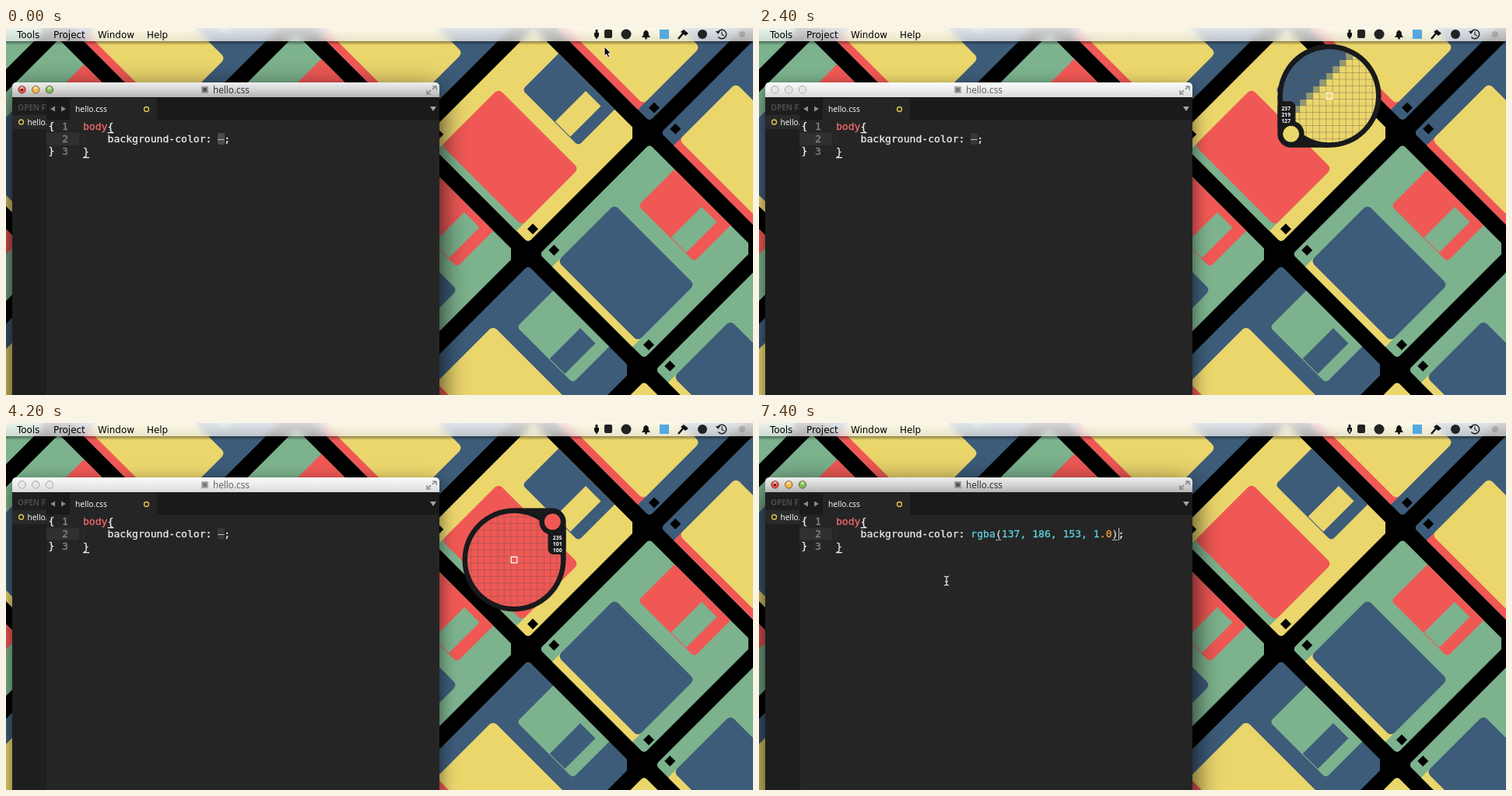
An HTML page with a canvas that plays this animation: 960 px wide and 472 px high, repeating every 7.6 s.

```html
<!DOCTYPE html>
<html lang="en">
<head>
<meta charset="utf-8">
<title>Color picker demo</title>
<style>
html, body { margin: 0; width: 100%; height: 100%; overflow: hidden; background: #000; }
canvas { display: block; }
</style>
</head>
<body>
<canvas id="stage" width="960" height="472"></canvas>
<script>
const W = 960, H = 472, LOOP = 7600, STEP = 200;
const stage = document.getElementById('stage').getContext('2d');
const UI = '"DejaVu Sans", sans-serif';
const LABEL = '"Noto Sans", sans-serif';
const CODE = '13.09px "DejaVu Sans Mono", monospace';
const YELLOW = '#ebd66c', RED = '#f05855', GREEN = '#7cb28d', BLUE = '#3d5c79';
let c = stage;

function text(str, x, y, color = '#000', font = '11.9px ' + UI, align = 'left') {
  c.fillStyle = color;
  c.font = font;
  c.textAlign = align;
  c.fillText(str, x, y);
}
function box(x, y, w, h, color, radius = 0) {
  c.fillStyle = color;
  c.beginPath();
  c.roundRect(x, y, w, h, radius);
  c.fill();
}
function dot(x, y, r, fill, stroke, width = 1) {
  c.beginPath();
  c.arc(x, y, r, 0, 7);
  if (fill) { c.fillStyle = fill; c.fill(); }
  if (stroke) { c.strokeStyle = stroke; c.lineWidth = width; c.stroke(); }
}
function shape(points, fill, stroke, width = 1) {
  c.beginPath();
  points.forEach(([x, y]) => c.lineTo(x, y));
  if (fill) { c.closePath(); c.fillStyle = fill; c.fill(); }
  if (stroke) { c.strokeStyle = stroke; c.lineWidth = width; c.stroke(); }
}
function fade(y0, y1, ...colors) {
  const g = c.createLinearGradient(0, y0, 0, y1);
  colors.forEach((color, i) => g.addColorStop(i / (colors.length - 1), color));
  return g;
}
function shadow(color, blur, dy) {
  c.shadowColor = color;
  c.shadowBlur = blur;
  c.shadowOffsetY = dy;
}

// Wallpaper: floppy disks on a diagonal lattice, in axes s = x + y and d = x - y.
const SCHEMES = {
  y: [YELLOW, RED, GREEN, BLUE],
  g: [GREEN, BLUE, YELLOW, RED],
  b: [BLUE, YELLOW, RED, GREEN]
};
const DISKS = [
  ['y', 0, 0], ['g', 1, 0], ['g', 2, 0], ['g', 0, 1], ['b', 1, 1], ['y', 2, 1],
  ['b', 0, -1], ['b', 1, -1], ['b', -1, 0], ['g', -1, 1], ['b', -2, 1],
  ['g', -2, 2], ['g', -3, 2], ['g', -2, 3], ['b', -1, 3]
];
function disk([scheme, i, j]) {
  const [body, label, stripe, shutter] = SCHEMES[scheme];
  c.save();
  c.transform(.5, .5, .5, -.5, 0, 0);
  c.translate(298 * i, -312 * j);
  box(678.5, 395, 268.5, 282.5, body, [7, 7, 0, 7]);
  shape([[948, 662], [948, 678.5], [931.5, 678.5]], '#000');
  box(711, 395, 206, 22, stripe);
  box(711, 409, 206, 146, label, 9);
  box(743, 584, 144, 93.5, shutter, [7, 7, 0, 0]);
  box(826, 585.5, 39, 78.5, body);
  box(928.5, 411.5, 14, 14, '#000');
  box(685, 411.5, 14, 14, '#000');
  c.restore();
}
const wallCanvas = document.createElement('canvas');
wallCanvas.width = W;
wallCanvas.height = H;
const wall = wallCanvas.getContext('2d', { willReadFrequently: true });
c = wall;
box(0, 0, W, H, '#000');
DISKS.forEach(disk);
c = stage;

function menuBar(open, picked) {
  c.save();
  c.beginPath();
  c.rect(0, 0, W, 17);
  c.clip();
  c.filter = 'blur(5px)';
  c.drawImage(wallCanvas, 0, 0);
  c.restore();
  box(0, 0, W, 17, fade(0, 17, 'rgba(255,255,255,.84)', 'rgba(235,235,235,.74)'));
  box(0, 17, W, 5, fade(17, 22, 'rgba(0,0,0,.4)', 'rgba(0,0,0,0)'));
  [['Tools', 14], ['Project', 61], ['Window', 118], ['Help', 181]]
    .forEach(([name, x]) => text(name, x, 12.5));

  if (open) box(754, 0, 10.5, 17, '#2450dc');
  box(757.5, 2, 3, 4, '#111', 1);
  shape([[756, 6], [762, 6], [762, 10], [759, 14.5], [756, 10]], '#111');
  if (picked) box(758, 8, 2, 4, GREEN);
  box(769, 2, 10, 11, '#222', 2);
  dot(797, 8, 6.5, '#222');
  shape([[817, 12], [819, 9], [819.5, 5], [822.5, 2.5], [825.5, 5], [826, 9], [828, 12]], '#111');
  dot(822.5, 13, 1.5, '#111');
  box(840, 2, 12, 12, '#55a9df');
  shape([[864, 14], [870, 7]], null, '#111', 2.5);
  shape([[867, 5], [871, 2], [877, 7], [873, 10]], '#111');
  dot(895, 8, 6, '#222');
  c.beginPath();
  c.arc(920, 8, 5.7, -2.6, 2.5);
  c.strokeStyle = '#222';
  c.lineWidth = 1.5;
  c.stroke();
  shape([[912, 4], [918, 4], [915, 8]], '#222');
  shape([[920, 4.5], [920, 8.5], [923, 10]], null, '#222', 1.2);
  dot(946, 8, 4, 'rgba(120,120,120,.4)');
}

function editorWindow(active, pasted, bright) {
  c.save();
  shadow(active ? 'rgba(0,0,0,.85)' : 'rgba(0,0,0,.6)', active ? 36 : 22, active ? 12 : 7);
  box(8, 70, 549, 440, '#252525', [5, 5, 0, 0]);
  c.restore();
  box(8, 70, 549, 19, active
    ? fade(70, 89, '#eeeeee', '#d5d5d5', '#b4b4b4')
    : fade(70, 89, '#fafafa', '#ececec', '#dadada'), [5, 5, 0, 0]);
  ['#e5504a', '#efb446', '#7fba54'].forEach((color, i) => {
    dot(20.5 + 17.7 * i, 79.3, 4.8, active ? color : '#e6e6e6', active ? 'rgba(70,40,20,.6)' : '#aaa');
    if (active) dot(20.5 + 17.7 * i, 77.3, 2.2, 'rgba(255,255,255,.5)');
  });
  if (active) dot(20.5, 79.5, 1.5, '#5d1111');
  box(251, 75, 9, 9, active ? '#999' : '#aaa', 1);
  box(253, 77, 5, 5, active ? '#555' : '#777');
  text('hello.css', 266, 83.7, active ? '#333' : '#666', '500 11.7px ' + LABEL);
  shape([[548, 75], [553, 75], [553, 80]], null, '#6b7480', 1.2);
  shape([[541, 80], [541, 85], [546, 85]], null, '#6b7480', 1.2);
  shape([[548, 79], [552, 75]], null, '#6b7480', 1.2);
  shape([[546, 80], [542, 84]], null, '#6b7480', 1.2);

  box(8, 89, 44, 383, '#1e1e1e');
  box(52, 89, 505, 29, '#1a1a1a');
  box(82, 90, 112, 28, '#252525', [3, 3, 0, 0]);
  box(8, 112, 44, 18, '#292929');
  c.save();
  c.beginPath();
  c.rect(8, 89, 44, 383);
  c.clip();
  text('OPEN FILES', 15, 106, '#4b4b4b', '600 10px ' + LABEL);
  text('hello.css', 27.5, 124.5, '#f0f0f0', '10px ' + LABEL);
  c.restore();
  dot(19.5, 121, 3, null, '#e5c84c', 1.3);
  dot(180.5, 104.5, 3, null, '#e5c84c', 1.3);
  shape([[63, 100.5], [63, 107.5], [57, 104]], '#8a8a8a');
  shape([[71, 100.5], [71, 107.5], [77, 104]], '#8a8a8a');
  shape([[545, 101], [553, 101], [549, 107]], '#a5a5a5');
  text('hello.css', 89, 107.5, '#f4f4f4', '10.2px ' + LABEL);

  // A hairline outline gives the code its heavier rendering.
  const code = (str, x, y, color = '#ececec') => {
    text(str, x, y, color, CODE);
    c.strokeStyle = color;
    c.lineWidth = .3;
    c.strokeText(str, x, y);
  };
  const column = n => 99 + 7.88 * n;
  box(52, 134.5, 42, 16, '#303030');
  [1, 2, 3].forEach((n, i) => code(n, 72, 131 + 16 * i, '#858585'));
  code('{', 54.5, 130);
  code('}', 54.5, 162);
  code('body', 99, 131, '#f0696b');
  code('{', column(4), 131);
  code('}', 99, 163);
  box(column(4), 134, 8, 1.3, '#ececec');
  box(99, 166, 8, 1.3, '#ececec');
  box(99, 135, 1, 15, '#303030');
  code('background-color:', column(4), 147);
  if (!pasted) {
    box(272, 135, 9, 15, bright ? '#4c4c4c' : '#373737', 2);
    code('–', column(22), 147, '#c4c4c4');
    code(';', column(23), 147);
    return;
  }
  let n = 22;
  [['rgba', '#5fd0dc'], ['(', '#ddd'], ['137, 186, 153, 1', '#5fd0dc'], ['.0', '#f8963f'],
   [')', '#ddd'], [';', '#ececec']].forEach(([part, color]) => {
    code(part, column(n), 147, color);
    if (part === '(' || part === ')') box(column(n), 150, 7.5, 1, '#aaa');
    n += part.length;
  });
  box(462, 135, 1, 16, '#c8c8c8');
}

function dropdown(hover) {
  c.save();
  shadow('rgba(0,0,0,.5)', 14, 5);
  box(754, 17, 201, 221, 'rgba(255,255,255,.95)', [0, 0, 5, 5]);
  c.restore();
  if (hover) box(754, 21, 201, 18, fade(21, 39, '#5a8cf4', '#1d53e0'));
  const black = '#303336', red = '#e85d5c';
  dot(779, 30, 6, '#25627c', '#345');
  dot(780, 30, 2.5, '#5cb0bd', '#183040');
  text('Color Picker', 790, 34, hover ? '#fff' : '#000');
  ['#e55', '#eb4', '#6b5', '#3aa', '#46c', '#a5c'].forEach((color, i) => {
    c.fillStyle = color;
    c.beginPath();
    c.moveTo(779, 48.5);
    c.arc(779, 48.5, 6, i * Math.PI / 3, (i + 1) * Math.PI / 3);
    c.fill();
  });
  dot(779, 48.5, 6, null, '#555');
  text('Color Wheel', 790, 52.5);
  [['0, 0, 0', black], ['0, 0, 0', black], ['235, 101, 100', red], ['235, 101, 100', red],
   ['43, 43, 43', black]].forEach(([rgb, color], i) => {
    const y = 77.5 + 18.4 * i;
    dot(779, y, 6, '#eee', '#777');
    dot(779, y, 4.5, color);
    box(775.5, y - 2.5, 7, 2.5, 'rgba(255,255,255,.5)', 1);
    text(`rgba(${rgb}, 1.0)`, 790, y + 4.3);
  });
  [64, 167, 195].forEach(y => box(755, y, 199, 1, '#ddd'));
  dot(779, 180.5, 6, '#eee', '#777');
  shape([[776.5, 178], [781.5, 183]], null, '#b52b2b', 2);
  shape([[781.5, 178], [776.5, 183]], null, '#b52b2b', 2);
  text('Clear History', 790, 185);
  text('Preferences', 772, 213);
  text('Quit', 772, 230);
}

// Screen colours and the values the loupe reads out for them.
const READOUTS = [
  [235, 214, 108, '237 219 127'], [240, 88, 85, '235 101 100'],
  [124, 178, 141, '137 186 153'], [61, 92, 121, '75 99 124'], [0, 0, 0, '0 0 0']
];
function readout(pixel) {
  const distance = color => Math.hypot(...[0, 1, 2].map(k => color[k] - pixel[k]));
  return READOUTS.reduce((a, b) => distance(b) < distance(a) ? b : a)[3].split(' ');
}

function loupe(x, y, onMenuIcon, flipped) {
  const R = 66.5, CELL = 8.5, side = flipped ? -1 : 1;
  const px = Math.round(x + 4), py = Math.round(y + 4);
  const pixel = onMenuIcon ? [0, 0, 0] : wall.getImageData(px, py, 1, 1).data;
  const rim = '#18191b', line = 'rgba(95,85,75,.36)';
  c.save();
  c.translate(x, y);
  c.save();
  c.scale(side, side);
  dot(0, 0, R, rim);
  box(-R, 0, R, R, rim, [0, 0, 0, 17.5]);
  c.restore();

  c.save();
  c.beginPath();
  c.arc(0, 0, 60, 0, 7);
  c.clip();
  if (onMenuIcon) {
    box(-60, -60, 120, 120, '#fff');
    box(-60, -60, 98.25, 106.75, '#080808');
  } else {
    c.imageSmoothingEnabled = false;
    c.drawImage(wallCanvas, px - 8, py - 8, 17, 17, -8.5 * CELL, -8.5 * CELL, 17 * CELL, 17 * CELL);
  }
  for (let k = -7.5; k < 8; k++) {
    box(k * CELL - .5, -60, 1, 120, line);
    box(-60, k * CELL - .5, 120, 1, line);
  }
  c.restore();

  c.strokeStyle = '#fff';
  c.lineWidth = 1.3;
  c.strokeRect(-3.8, -3.8, 7.6, 7.6);
  c.save();
  c.scale(side, side);
  box(-R, 7, 23, 42, rim, 7);
  dot(-49.3, 49, 17, rim);
  dot(-49.3, 49, 10.5, `rgb(${pixel[0]},${pixel[1]},${pixel[2]})`);
  c.restore();
  readout(pixel).forEach((value, k) =>
    text(value, -55.7 * side, (flipped ? -26.5 : 18.8) + 8 * k, '#fff', '600 6.8px ' + LABEL, 'center'));
  c.restore();
}

function arrow(x, y) {
  shape([[x, y], [x, y + 12], [x + 2.7, y + 9.5], [x + 4.6, y + 13.8],
    [x + 6.7, y + 12.9], [x + 4.9, y + 8.7], [x + 8.5, y + 8.7], [x, y]], '#000', '#fff', .9);
}
function iBeam(x, y) {
  shape([[x - 3, y - 6], [x, y - 5], [x + 3, y - 6]], null, '#eee', 1.2);
  shape([[x - 3, y + 6], [x, y + 5], [x + 3, y + 6]], null, '#eee', 1.2);
  shape([[x, y - 5], [x, y + 5]], null, '#eee', 1.2);
  shape([[x - 2, y + 1], [x + 2, y + 1]], null, '#eee');
}

// Pointer stops: time, x, y.
const PATH = [
  [0, 769, 24], [200, 767, 21], [600, 759, 10], [800, 759, 10], [1200, 796, 28], [1400, 796, 28],
  [1600, 771, 33], [1800, 771, 33], [2700, 714, 114.5], [3200, 714, 114.5], [4000, 653, 176],
  [4400, 653, 176], [4800, 628, 226], [5200, 628, 226], [6000, 310, 160], [6200, 277, 145],
  [6600, 277, 145], [7000, 241, 203], [7600, 241, 203]
];
function pointerAt(t) {
  const i = PATH.findIndex(stop => stop[0] > t);
  const [t0, x0, y0] = PATH[i - 1], [t1, x1, y1] = PATH[i];
  const k = (t - t0) / (t1 - t0);
  return [x0 + (x1 - x0) * k, y0 + (y1 - y0) * k];
}

function draw(t) {
  const [x, y] = pointerAt(t);
  const menuOpen = t >= 600 && t < 1600;
  const picking = t >= 1600 && t < 5000;
  c.drawImage(wallCanvas, 0, 0);
  editorWindow(t < 1600 || t >= 6200, t >= 6800, t < 400);
  menuBar(menuOpen, t >= 5000);
  if (menuOpen) dropdown(y > 21);
  if (picking) loupe(x, y, t < 2000, t >= 3600);
  else if (t > 5000 && x < 557) iBeam(x, y);
  else arrow(x, y);
}

const start = performance.now();
function tick() {
  const t = (performance.now() - start) % LOOP;
  draw(Math.floor(t / STEP) * STEP);
  requestAnimationFrame(tick);
}
tick();
</script>
</body>
</html>
```
